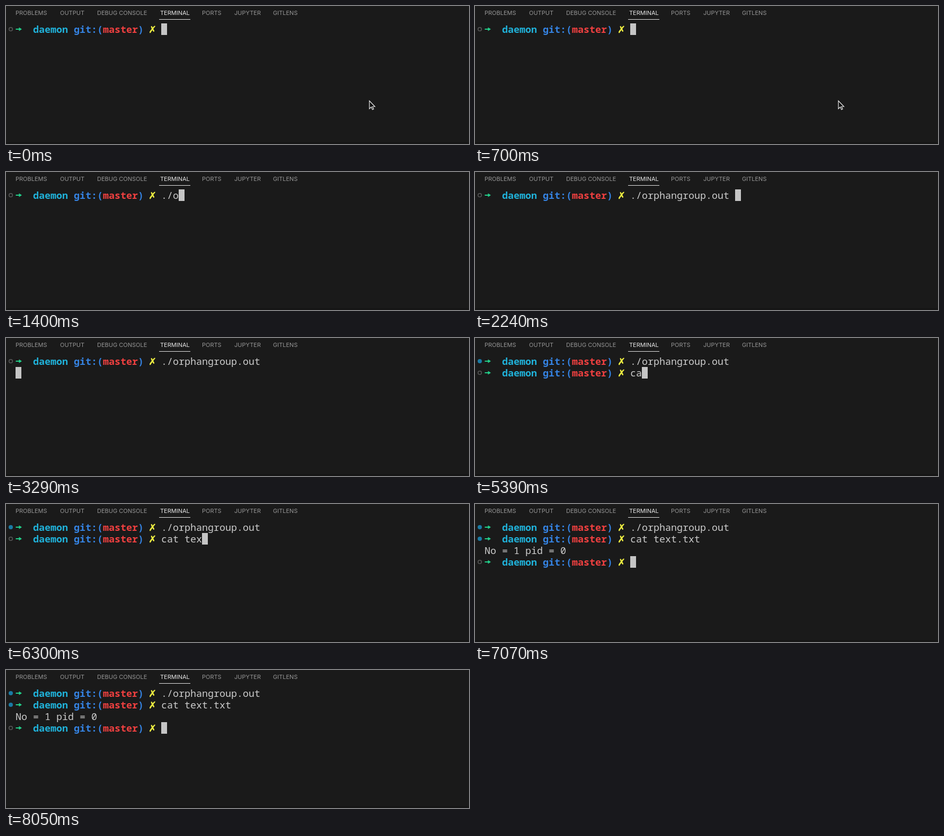
An HTML page that plays this animation: 874 px wide and 262 px high, repeating every 8.12 s.

```html
<!DOCTYPE html>
<html lang="en">
<head>
<meta charset="utf-8">
<title>Terminal</title>
<style>
  html, body { margin: 0; width: 100%; height: 100%; overflow: hidden; background: #1a1a1a; }
  svg { display: block; }
  text { white-space: pre; }
  .tabs { font: 11px Inter, sans-serif; fill: #969696; }
  .term { font: 18.333px "Noto Sans Mono", monospace; fill: #ccc; }
  .prompt { font-weight: 700; }
  .cross { font: 18px "DejaVu Sans", sans-serif; fill: #f5f543; stroke: #f5f543; stroke-width: .4; }
</style>
</head>
<body>
<svg width="874" height="262">
  <rect width="874" height="262" fill="#1a1a1a"/>
  <rect y="258" width="874" height="4" fill="#161616"/>
  <g class="tabs">
    <text x="18" y="17">PROBLEMS</text>
    <text x="102" y="17">OUTPUT</text>
    <text x="172" y="17">DEBUG CONSOLE</text>
    <text x="291" y="17" fill="#e7e7e7">TERMINAL</text>
    <text x="370" y="17">PORTS</text>
    <text x="431" y="17">JUPYTER</text>
    <text x="504" y="17">GITLENS</text>
  </g>
  <rect x="289" y="25" width="59" height="1" fill="#e7e7e7"/>
  <g class="term" id="screen"></g>
  <path id="mouse" d="M686 180v15l3.5-3.3 2.3 5 2.2-1-2.2-4.7h4.6z" fill="#111" stroke="#eee" stroke-width="1.2"/>
</svg>
<script>
const LOOP = 8120, CELL = 11, LINE = 22, LEFT = 18, TOP = 33, PROMPT_COLS = 25;
const screen = document.getElementById('screen');
const mouse = document.getElementById('mouse');

// Each entry: start time, text of the command line so far.
const first = [[0, ''], [770, '.'], [980, './'], [1190, './o'], [1610, './orphan'],
  [1890, './orphang'], [2100, './orphangroup.out ']];
const second = [[0, ''], [4900, 'c'], [5180, 'ca'], [5530, 'cat'], [5740, 'cat '],
  [5880, 'cat t'], [6020, 'cat te'], [6160, 'cat tex'], [6370, 'cat text.txt ']];
const RUN = 2870, PROMPT_2 = 3920, PROMPT_3 = 6860;

const typed = (keys, t) => keys.filter(k => k[0] <= t).pop()[1];
const text = (col, s, fill = '#ccc') => `<text x="${LEFT + col * CELL}" y="18" fill="${fill}">${s}</text>`;
const line = (row, body) => `<g transform="translate(0 ${TOP + row * LINE})">${body}</g>`;
const cursor = (row, col) =>
  line(row, `<rect x="${LEFT + col * CELL}" width="11" height="22" fill="#c5c5c5"/>`);

function prompt(row, command, done) {
  const mark = done ? 'r="4" fill="#1a7ba5"' : 'r="3.3" fill="none" stroke="#5a5a5a" stroke-width="1.5"';
  return line(row, `<circle cx="9" cy="11" ${mark}/>
    <path d="M18.5 10h6V7.4l5.5 3.6-5.5 3.6V12h-6z" fill="#23d18b"/>
    <g class="prompt">${text(3, 'daemon', '#20b2da')}${text(10, 'git:(', '#3583e2')}
    ${text(15, 'master', '#f04040')}${text(21, ')', '#3583e2')}</g>
    <text class="cross" x="269" y="18">✗</text>${text(PROMPT_COLS, command)}`);
}

function render(t) {
  const a = typed(first, t), b = typed(second, t);
  let out = prompt(0, a, t >= PROMPT_2);
  if (t >= PROMPT_2) out += prompt(1, b, t >= PROMPT_3);
  if (t >= PROMPT_3)
    out += line(2, text(0, 'No = 1 pid = 0')) + prompt(3, '', false) + cursor(3, PROMPT_COLS);
  else if (t >= PROMPT_2) out += cursor(1, PROMPT_COLS + b.length);
  else if (t >= RUN) out += cursor(1, 0);
  else out += cursor(0, PROMPT_COLS + a.length);
  return out;
}

let shown;
function tick() {
  const t = performance.now() % LOOP;
  const next = render(t);
  if (next !== shown) screen.innerHTML = shown = next;
  mouse.style.display = t < first[1][0] ? '' : 'none';
  requestAnimationFrame(tick);
}
tick();
</script>
</body>
</html>
```
